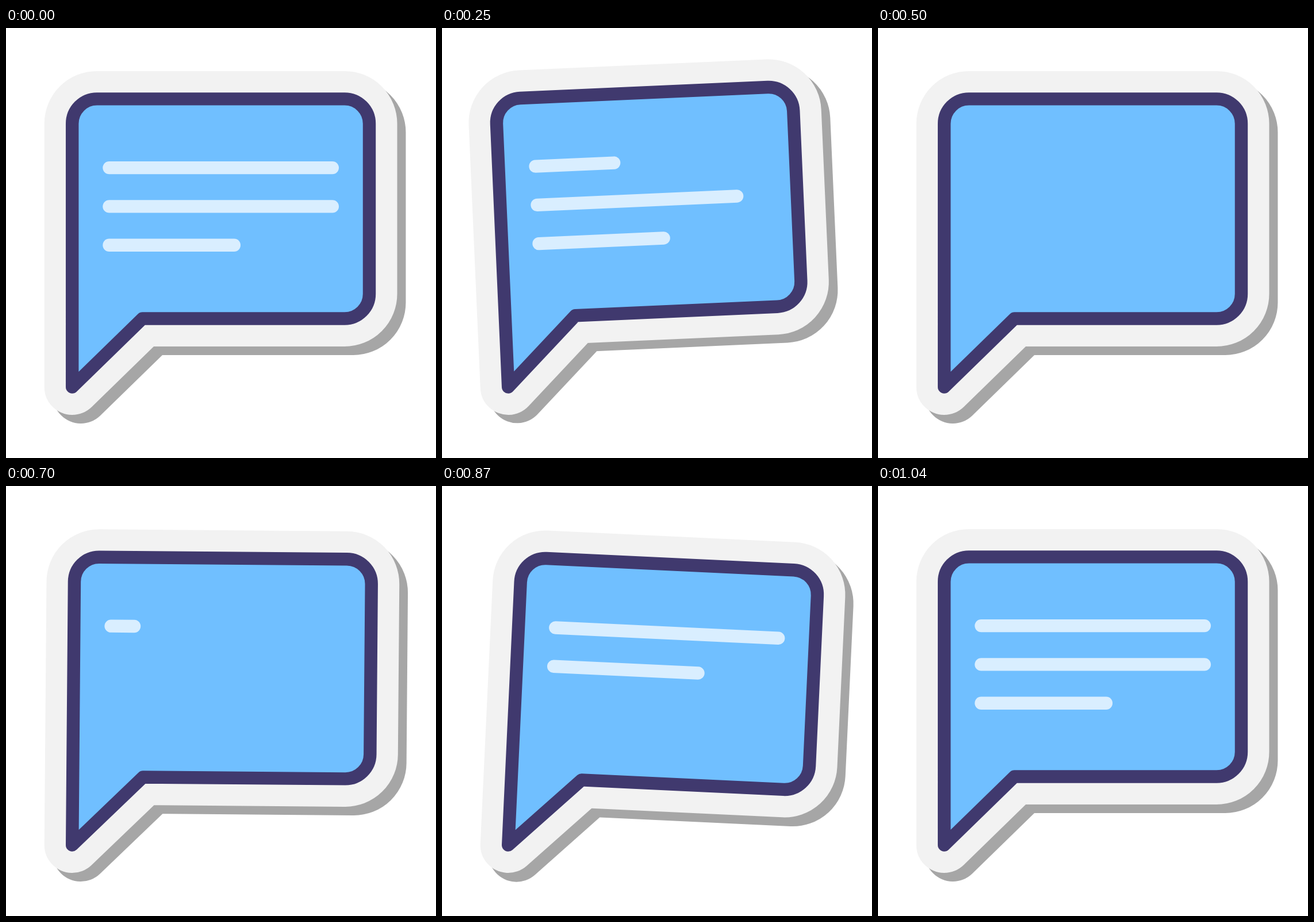
These frames come from a looping animation (748 px wide and 748 px high, 1160 ms). An HTML page with a canvas:

```html
<!DOCTYPE html>
<html lang="en">
<head>
<meta charset="utf-8">
<title>Message sticker</title>
<style>
  html, body { margin: 0; width: 100%; height: 100%; overflow: hidden; background: #fff; }
  canvas { display: block; width: 748px; height: 748px; }
</style>
</head>
<body>
<canvas id="stage"></canvas>
<script>
const SIZE = 748, LOOP = 1160, FPS = 24;
const TIP = { x: 115.2, y: 624.5 };
const LINE = 22.44, RIM = 97, SHADOW = 14.96, TILT = 3;

const canvas = document.getElementById('stage');
const ctx = canvas.getContext('2d');
const dpr = window.devicePixelRatio || 1;
canvas.width = canvas.height = Math.round(SIZE * dpr);

// Text bars: y, right end, ticks for hiding and for writing
const bars = [
  { y: 243.1, end: 567.8, hide: [3, 8], show: [16, 21] },
  { y: 310.4, end: 567.8, hide: [5, 10], show: [18, 23] },
  { y: 377.7, end: 396.8, hide: [9, 12], show: [22, 25] }
];
const BAR_X = 179.5;

const bubble = makeBubble(TIP.x, 123.4, 632, 505.5, 43, 237.3);

function makeBubble(left, top, right, bottom, r, notch) {
  const p = new Path2D();
  p.moveTo(TIP.x, TIP.y);
  p.lineTo(left, top + r);
  p.arcTo(left, top, left + r, top, r);
  p.lineTo(right - r, top);
  p.arcTo(right, top, right, top + r, r);
  p.lineTo(right, bottom - r);
  p.arcTo(right, bottom, right - r, bottom, r);
  p.lineTo(notch, bottom);
  p.closePath();
  return p;
}

// Eased progress from 0 to 1 between two ticks
function ease(tick, [from, to]) {
  const u = Math.min(1, Math.max(0, (tick - from) / (to - from)));
  return u * u * (3 - 2 * u);
}

function angleAt(tick) {
  const left = ease(tick, [3, 7]) - ease(tick, [7, 12]);
  const right = ease(tick, [16, 20]) - ease(tick, [20, 25]);
  return TILT * (right - left) * Math.PI / 180;
}

function paint(color, width) {
  ctx.fillStyle = ctx.strokeStyle = color;
  ctx.lineWidth = width;
  ctx.fill(bubble);
  ctx.stroke(bubble);
}

function drawBar(bar, tick) {
  const part = 1 - ease(tick, bar.hide) + ease(tick, bar.show);
  if (part < 0.001) return;
  ctx.beginPath();
  ctx.moveTo(BAR_X, bar.y);
  ctx.lineTo(BAR_X + (bar.end - BAR_X) * part, bar.y);
  ctx.stroke();
}

function draw(tick) {
  ctx.setTransform(dpr, 0, 0, dpr, 0, 0);
  ctx.fillStyle = '#fff';
  ctx.fillRect(0, 0, SIZE, SIZE);
  ctx.lineJoin = ctx.lineCap = 'round';

  ctx.translate(TIP.x, TIP.y);
  ctx.rotate(angleAt(tick));
  ctx.translate(-TIP.x, -TIP.y);

  ctx.save();
  ctx.translate(SHADOW, SHADOW);
  paint('#a6a6a6', RIM);
  ctx.restore();
  paint('#f2f2f2', RIM);

  ctx.fillStyle = '#70bfff';
  ctx.fill(bubble);
  ctx.strokeStyle = '#40396e';
  ctx.lineWidth = LINE;
  ctx.stroke(bubble);

  ctx.strokeStyle = '#d9eeff';
  bars.forEach(bar => drawBar(bar, tick));
}

// 24 ticks per second, each starting on a whole hundredth of a second
function tickAt(ms) {
  const hundredths = Math.floor((ms % LOOP) / 10);
  return Math.ceil((hundredths + 1) * FPS / 100) - 1;
}

const start = performance.now();
function loop() {
  draw(tickAt(performance.now() - start));
  requestAnimationFrame(loop);
}
loop();
</script>
</body>
</html>
```
